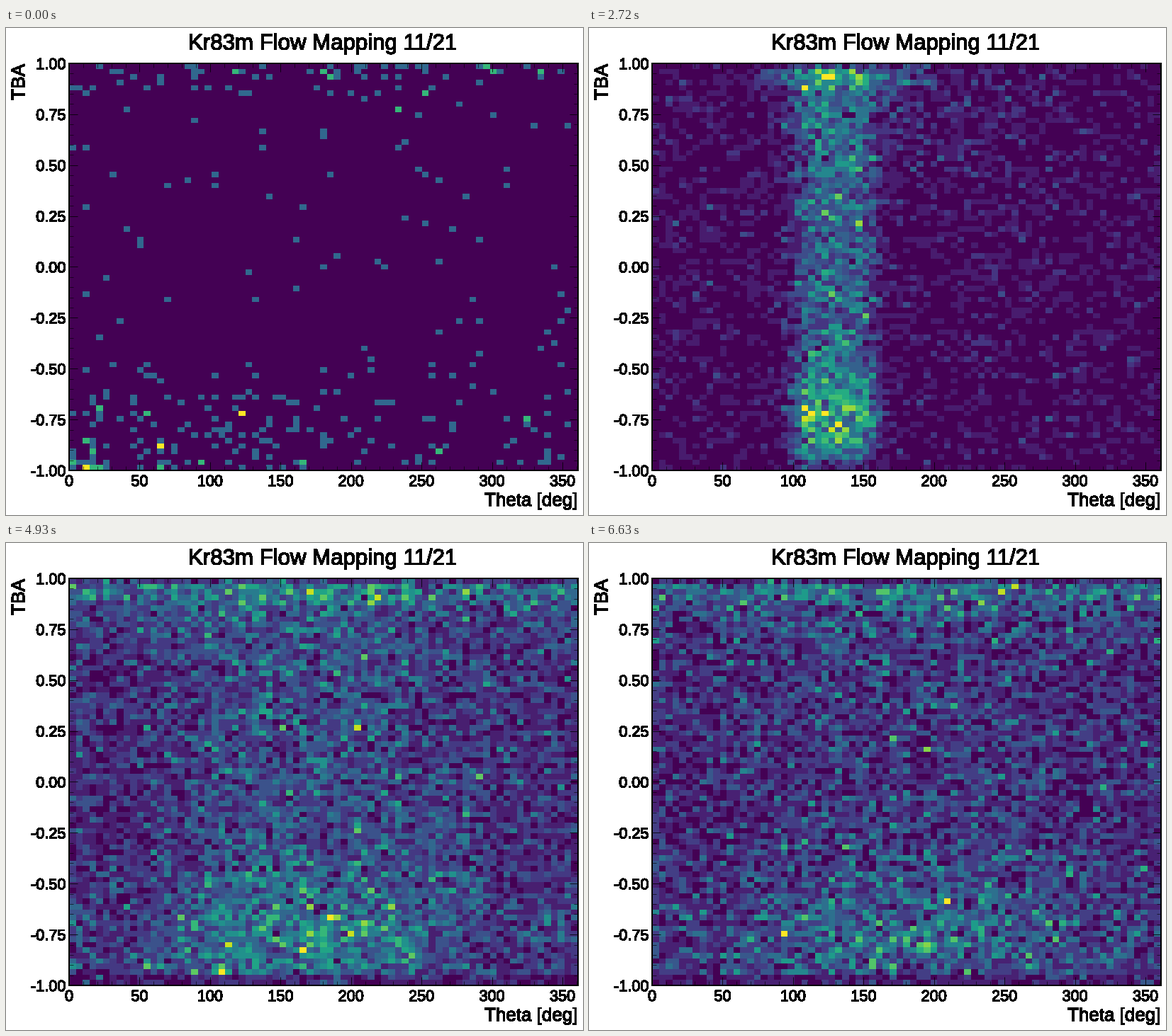
Animation of 814 by 688 pixels, one loop 6800 ms. Source, as a matplotlib script:

```python
import matplotlib.pyplot as plt
import numpy as np
from matplotlib.animation import FuncAnimation
from matplotlib.patheffects import Stroke
from matplotlib.ticker import AutoMinorLocator, MultipleLocator

W, H, DPI = 814, 688, 72
LEFT, RIGHT, TOP, BOTTOM = 89, 807, 50, 625
BINS, THETA_MAX = 75, 361
FRAMES, STEP_MS = 40, 170
INJECT, SPREAD = 12, 20  # steps when the flow enters and starts to spread
ALL = 900                # blob width that covers every angle

plt.rcParams.update({
    "font.family": "Liberation Sans",
    "axes.unicode_minus": False,
    "axes.axisbelow": False,
    "axes.linewidth": 2,
})

x_edges = np.linspace(0, THETA_MAX, BINS + 1)
y_edges = np.linspace(-1, 1, BINS + 1)
theta, tba = np.meshgrid((x_edges[1:] + x_edges[:-1]) / 2,
                         (y_edges[1:] + y_edges[:-1]) / 2)


def ramp(t, start, end):
    return min(max((t - start) / (end - start), 0), 1)


def lerp(a, b, k):
    return a + (b - a) * k


def pulse(t, centre, width):
    return np.exp(-((t - centre) / width) ** 2)


def blob(amp, x, w, y, h):
    """Flat-topped in angle, Gaussian in height."""
    return amp * np.exp(-((theta - x) / w) ** 4 - ((tba - y) / h) ** 2)


def quiet(t):
    """Sparse background that gathers near both ends."""
    age = ramp(t, 0, INJECT)
    return (.008 + blob(lerp(.08, .012, age), 180, ALL, 1, .12)
            + blob(.055, 90, 110, -1, .35)
            + blob(lerp(.025, .005, age), 180, ALL, -.85, .3)
            + blob(.16, 10, 20, -1, .07))


def flow(t):
    """A plume rises, runs along the top, comes down and mixes."""
    enter = ramp(t, INJECT, SPREAD)
    mix = ramp(t, 23, 32)
    x = lerp(130, 185, mix)
    w = lerp(22, 36, enter) + 75 * mix
    level = lerp(.02, .12, ramp(t, 17, 29))
    level += blob(lerp(.19, .05, mix), x, w, 0, 2)
    level += blob(lerp(.21, .12, mix), x, w, -.75, .25)
    level += blob(.06 * mix, 180, ALL, -.75, .3)

    # Top layer that widens from the plume to every angle
    reach = 60 * np.exp(.22 * max(t - SPREAD, 0))
    thin = ramp(t, SPREAD, 28)
    arrive = ramp(t, 14, SPREAD)
    level += blob(lerp(.42, .18, thin) * arrive, x, reach, .94, .07)
    level += blob(lerp(.15, .06, thin) * arrive, x + 10, .8 * reach, .85, .2)
    level += blob(.1 * pulse(t, 21, 4), 215, 70, .75, .4)

    # Return column on the far side
    back = pulse(t, 25, 3)
    level += blob(.14 * back, 278, 36, 0, .9)
    level += blob(.18 * back, 283, 20, -.75, .25)
    level += blob(.06 * back, 280, 75, -.4, .7)

    # The outermost rows stay dim
    level[:2] *= .4
    level[-1] *= .5
    return level


def peak_count(t):
    if t <= INJECT:
        return round(lerp(3, 5, t / INJECT))
    if t <= SPREAD:
        return round(lerp(5, 36, ramp(t, INJECT, SPREAD)))
    return round(10.5 + 25.5 * np.exp((SPREAD - t) / 4))


def histogram(step):
    rng = np.random.default_rng(100 + step)
    peak = peak_count(step)
    level = lerp(quiet(step), flow(step), ramp(step, INJECT, 16))
    counts = np.minimum(rng.poisson(peak * level), peak)
    if step <= INJECT:
        counts[0, rng.integers(1, 11)] = peak
    return counts / counts.max()


def crisp(text):
    text.set_path_effects([Stroke(linewidth=.3, foreground="black",
                                  antialiased=False)])


def label(x, y, text, size, **kw):
    crisp(fig.text(x / W, 1 - y / H, text, size=size, va="baseline",
                   rotation_mode="anchor", **kw))


fig = plt.figure(figsize=(W / DPI, H / DPI), dpi=DPI, facecolor="white")
ax = fig.add_axes([LEFT / W, 1 - BOTTOM / H,
                   (RIGHT - LEFT) / W, (BOTTOM - TOP) / H])
mesh = ax.pcolormesh(x_edges, y_edges, histogram(0), cmap="viridis",
                     vmin=0, vmax=1)
ax.set(xlim=(0, THETA_MAX), ylim=(-1, 1))

ax.xaxis.set_major_locator(MultipleLocator(50))
ax.yaxis.set_major_locator(MultipleLocator(.25))
ax.yaxis.set_major_formatter("{x:.2f}")
for axis in (ax.xaxis, ax.yaxis):
    axis.set_minor_locator(AutoMinorLocator(5))
ax.tick_params(which="major", direction="in", top=True, right=True,
               length=12, width=.8, labelsize=21.67)
ax.tick_params(which="minor", direction="in", top=True, right=True,
               length=6, width=.6)
ax.tick_params(axis="x", pad=6)
ax.tick_params(axis="y", pad=4.5)
for tick_label in ax.get_xticklabels() + ax.get_yticklabels():
    crisp(tick_label)

label(447, 30.5, "Kr83m Flow Mapping 11/21", 31.2, ha="center")
label(807, 675, "Theta [deg]", 26, ha="right")
label(26, 51, "TBA", 26, ha="right", rotation=90)


def update(step):
    mesh.set_array(histogram(step))
    return [mesh]


anim = FuncAnimation(fig, update, frames=FRAMES, interval=STEP_MS,
                     repeat=True, repeat_delay=0, blit=False)
plt.show()
```
